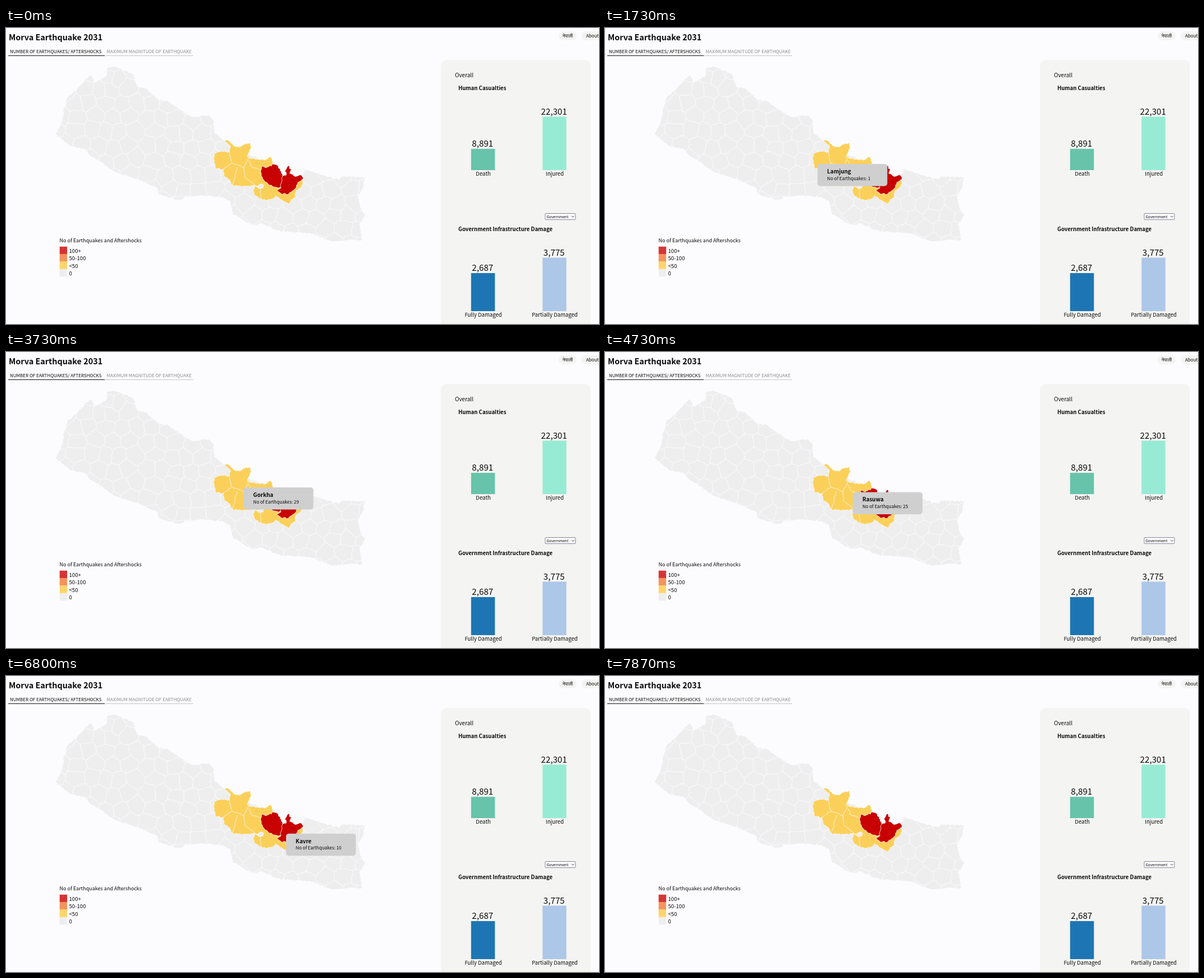
Write an HTML page that moves like this. It is 1058 px wide and 529 px high and loops after 8000 ms.

```html
<!DOCTYPE html>
<html lang="en">
<head>
<meta charset="utf-8">
<title>Earthquake map</title>
<style>
  html, body { margin: 0; width: 100%; height: 100%; overflow: hidden; background: #fcfcfe; }
  svg { display: block; width: 100vw; height: 100vh; }
  text { font-family: "Noto Sans CJK JP", "Noto Sans CJK SC", "Noto Sans CJK", "Noto Sans", sans-serif; fill: #0a0a0a; }
  .b { font-weight: 700; }
  .mid { text-anchor: middle; }
  .soft { fill: #8a8a8c; }
  .border { stroke: #fcfcfe; stroke-width: 0.8; stroke-linejoin: round; }
</style>
</head>
<body>
<svg id="stage" viewBox="0 0 1058 529"></svg>
<script>
const NS = "http://www.w3.org/2000/svg";
const stage = document.getElementById("stage");

function add(tag, attrs, parent = stage, content) {
  const node = document.createElementNS(NS, tag);
  for (const key in attrs) node.setAttribute(key, attrs[key]);
  if (content !== undefined) node.textContent = content;
  parent.appendChild(node);
  return node;
}
const rect = (x, y, width, height, fill, rx = 0, parent = stage) =>
  add("rect", { x, y, width, height, fill, rx }, parent);
const text = (x, y, size, content, cls = "", parent = stage) =>
  add("text", { x, y, "font-size": size, class: cls }, parent, content);

const GREY = "#eeeeef", YELLOW = "#fbd05a", RED = "#c80202";
const mix = (a, b, f) => a + (b - a) * f;

// The wobble depends on position only, so neighbours share the same ragged border.
const wobble = (x, y) => [
  x + 0.8 * Math.sin(1.3 * x + 0.7 * y) + 0.4 * Math.sin(2.1 * y),
  y + 0.8 * Math.sin(1.1 * y - 0.9 * x) + 0.4 * Math.sin(1.9 * x)
];
const parse = s => s.trim().split(/\s+/).map(p => p.split(",").map(Number));

function ragged(points, closed = true) {
  const ends = closed ? [...points, points[0]] : points;
  const out = [wobble(...ends[0])];
  for (let i = 1; i < ends.length; i++) {
    const [ax, ay] = ends[i - 1], [bx, by] = ends[i];
    const steps = Math.ceil(Math.hypot(bx - ax, by - ay) / 3);
    for (let k = 1; k <= steps; k++) out.push(wobble(mix(ax, bx, k / steps), mix(ay, by, k / steps)));
  }
  return "M" + out.map(p => p.map(v => v.toFixed(1)).join(" ")).join("L") + (closed ? "Z" : "");
}
const region = (points, fill) => add("path", { d: ragged(parse(points)), fill, class: "border" });
const divide = points => add("path", { d: ragged(parse(points), false), fill: "none", class: "border" });

function randomFrom(seed) {
  return () => (seed = (seed * 16807) % 2147483647) / 2147483647;
}

// Jittered staggered grid of district centres.
function districtCentres(gap) {
  const random = randomFrom(77), centres = [];
  for (let row = 0; row < 15; row++)
    for (let col = 0; col < 21; col++)
      centres.push([
        75 + (col + (row % 2) / 2 + (random() - 0.5) * 0.6) * gap,
        60 + (row + (random() - 0.5) * 0.6) * gap * 0.87
      ]);
  return centres;
}

// Area closer to one centre than to any other.
function cell([cx, cy], centres) {
  let poly = [[-60, -60], [60, -60], [60, 60], [-60, 60]].map(([x, y]) => [cx + x, cy + y]);
  for (const [ox, oy] of centres) {
    const dx = ox - cx, dy = oy - cy;
    if ((!dx && !dy) || Math.hypot(dx, dy) > 120) continue;
    const side = ([x, y]) => (x - (cx + ox) / 2) * dx + (y - (cy + oy) / 2) * dy;
    poly = poly.flatMap((p, i) => {
      const q = poly[(i + 1) % poly.length], a = side(p), b = side(q), kept = a <= 0 ? [p] : [];
      if (a * b < 0) kept.push([mix(p[0], q[0], a / (a - b)), mix(p[1], q[1], a / (a - b))]);
      return kept;
    });
  }
  return poly;
}

function drawMap() {
  const outline = ragged(parse(`89,190 102,160 104,143 110,124 128,108 146,88 152,84 158,98 179,86 181,71 194,69
    226,82 235,106 249,107 273,128 290,131 325,156 337,160 350,156 362,157 370,165 372,187 390,201 432,226
    476,243 493,262 518,265 528,262 533,252 562,262 594,271 600,265 640,267 638,280 628,303 634,325 641,335
    631,352 635,380 620,378 582,382 545,367 488,363 455,349 440,353 405,332 399,309 388,303 352,299 320,302
    310,308 272,297 270,286 228,268 198,259 150,227 140,216 118,212 104,203`));
  add("path", { d: outline }, add("clipPath", { id: "land" }));
  const land = add("g", { "clip-path": "url(#land)", fill: GREY });
  const centres = districtCentres(29);
  centres.forEach(c => add("path", { d: ragged(cell(c, centres)), class: "border" }, land));

  region(`390,201 398,201 407,211 417,213 426,207 436,206 437,213 431,227 436,233 462,236 473,229 476,243
    492,270 530,272 528,284 518,291 515,303 507,309 506,316 497,310 481,300 479,304 466,308 455,306 444,300
    441,290 444,281 432,283 404,282 398,270 389,264 387,253 374,251 371,238 372,224 384,220 398,222 401,213`, YELLOW);
  divide("398,222 403,241 387,253");
  divide("403,241 424,249 432,236 431,227");
  divide("412,250 404,282");
  divide("424,249 427,268 444,281");
  divide("433,236 438,247 456,255");
  divide("444,281 454,290 455,306");
  region("446,284 456,278 461,281 456,287", GREY);
  region("456,248 466,249 478,243 484,246 490,254 495,267 492,276 494,284 486,286 470,281 459,272 455,262", RED);
  region(`493,264 500,263 498,254 504,246 508,252 507,260 516,266 527,262 530,270 521,276 518,286 503,297
    491,296 483,291 490,286`, RED);
}

function drawHeader() {
  text(5, 22, 14.4, "Morva Earthquake 2031", "b");
  text(7, 45, 8, "NUMBER OF EARTHQUAKES/ AFTERSHOCKS");
  text(179.5, 45, 8.1, "MAXIMUM MAGNITUDE OF EARTHQUAKE", "soft");
  rect(4, 49, 172, 1, "#111");
  rect(176, 49, 158, 1, "#c4c4c6");
  rect(986, 6, 32, 16, "#f4f4f3", 8);
  text(1002, 17, 8.6, "नेपाली", "mid");
  rect(1027, 6, 44, 16, "#f4f4f3", 8);
  text(1035, 17, 8, "About");
}

function drawLegend() {
  text(95.5, 382.5, 9.03, "No of Earthquakes and Aftershocks");
  const entries = { "100+": "#d63535", "50-100": "#f4945d", "<50": "#fdd56b", " 0": GREY };
  Object.entries(entries).forEach(([label, fill], i) => {
    rect(95.7, 390.7 + i * 13.4, 13.4, 13.4, fill);
    text(112.5, 401.7 + i * 13.4, 9.6, label.trim());
  });
}

function drawChart(title, titleY, bottom, bars) {
  text(807, titleY, 9.6, title, "b");
  bars.forEach(([label, value, height, fill], i) => {
    const x = 829.8 + i * 127.5;
    rect(x, bottom - height, 42.5, height, fill);
    text(x + 20.5, bottom - height - 4, 15.2, value.toLocaleString("en-US"), "mid");
    text(x + 21.8, bottom + 10.2, 9.6, label, "mid");
  });
}

function drawPanel() {
  rect(776, 57, 267, 500, "#f4f4f2", 10);
  text(801, 87.5, 10, "Overall");
  drawChart("Human Casualties", 111, 254, [
    ["Death", 8891, 38, "#67c4ab"], ["Injured", 22301, 95.5, "#97ebd5"]
  ]);
  drawChart("Government Infrastructure Damage", 363, 506, [
    ["Fully Damaged", 2687, 68, "#1d76b3"], ["Partially Damaged", 3775, 95.5, "#adc7e8"]
  ]);
  rect(962, 331.5, 54, 11, "#fdfdff", 1).setAttribute("stroke", "#85859a");
  text(964.5, 339.6, 6.7, "Government");
  add("path", { d: "M1009 335.8l2.5 2.5l2.5-2.5", fill: "none", stroke: "#333", "stroke-width": 0.9 });
}

drawHeader();
drawMap();
drawLegend();
drawPanel();

const tip = add("g", {});
rect(0, 0, 124.5, 39.5, "#cfcfd0", 5, tip);
const tipName = text(17.2, 17, 9.9, "", "b", tip);
const tipCount = text(17.2, 28.8, 8, "", "", tip);

// Each stop: time, tooltip position, hovered district (none hides the tooltip).
const counts = { Lamjung: 1, Gorkha: 29, Rasuwa: 25, Nuwakot: 33, Kavre: 10 };
const stops = [
  [0, 374, 246], [1400, 374, 246, "Lamjung"], [1730, 379, 243, "Lamjung"], [1800, 392, 235, "Lamjung"],
  [2300, 396, 238, "Gorkha"], [2800, 409, 241, "Gorkha"], [2930, 405.5, 265.5, "Gorkha"],
  [3800, 425.5, 240, "Gorkha"], [4070, 425.5, 240], [4530, 436, 246, "Rasuwa"], [4730, 442, 250.5, "Rasuwa"],
  [5070, 455, 250, "Rasuwa"], [5930, 453, 267, "Nuwakot"], [6200, 453, 272.5, "Nuwakot"],
  [6700, 504, 279, "Kavre"], [7330, 477, 295.5, "Kavre"], [7670, 503, 299], [8000, 503, 299]
];

function update(now) {
  const t = now % 8000;
  const next = stops.findIndex(s => s[0] > t);
  const [t0, x0, y0, name] = stops[next - 1], [t1, x1, y1] = stops[next];
  tip.setAttribute("visibility", name ? "visible" : "hidden");
  if (!name) return;
  const f = (t - t0) / (t1 - t0);
  tip.setAttribute("transform", `translate(${mix(x0, x1, f)} ${mix(y0, y1, f)})`);
  tipName.textContent = name;
  tipCount.textContent = "No of Earthquakes: " + counts[name];
}

function frame() {
  update(performance.now());
  requestAnimationFrame(frame);
}
frame();
</script>
</body>
</html>
```
